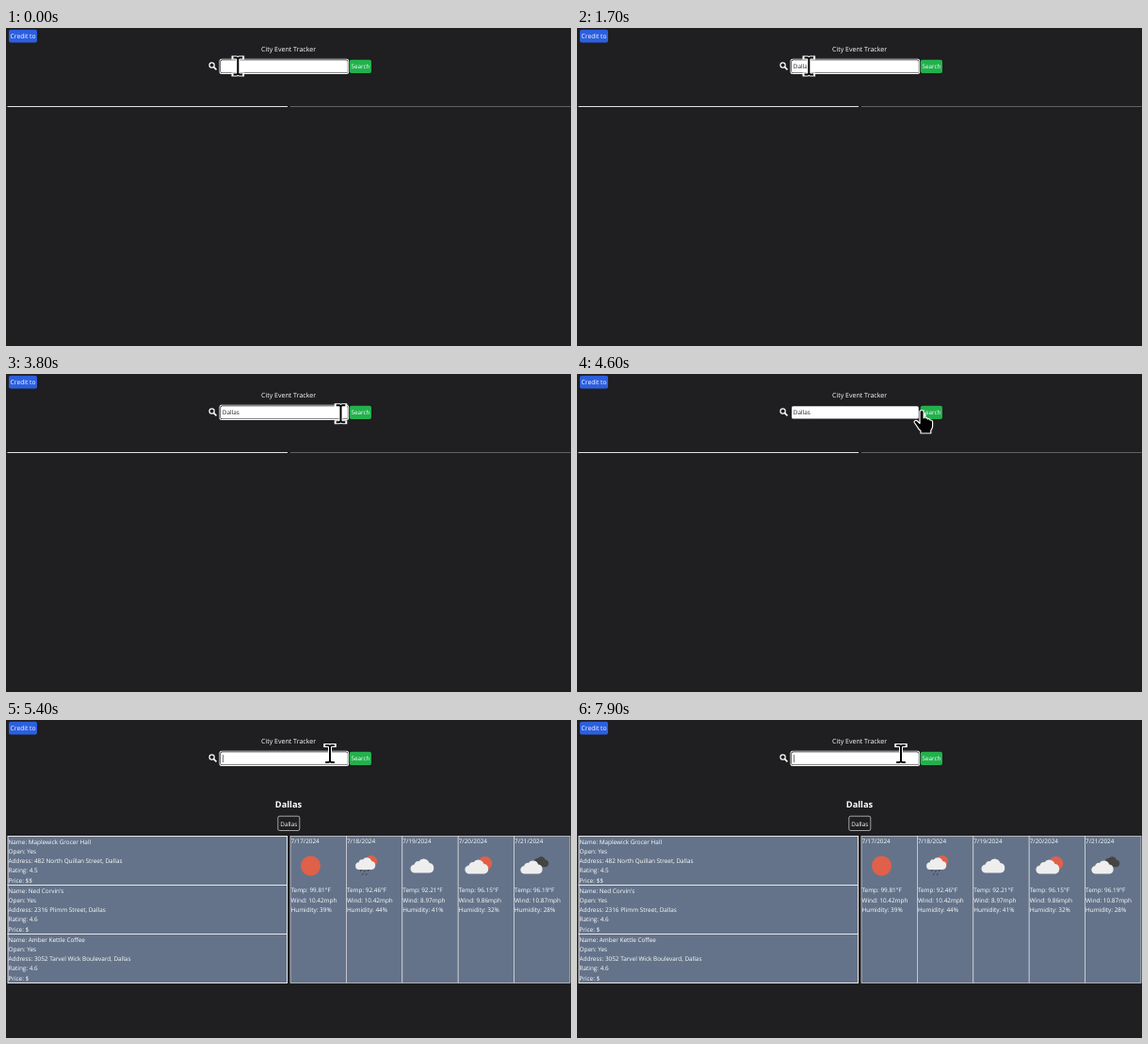
Write an HTML page that moves like this. It is 600 px wide and 338 px high and loops after 8000 ms.

```html
<!DOCTYPE html>
<html lang="en">
<head>
<meta charset="utf-8">
<title>City Event Tracker</title>
<style>
  html, body { margin: 0; height: 100%; overflow: hidden; background: #1f1e20; }
  svg { display: block; width: 100vw; height: 100vh; }
  text { font: 6.4px "Open Sans", "Noto Sans", sans-serif; fill: #fff; text-rendering: geometricPrecision; white-space: pre; }
  .mid { text-anchor: middle; }
  .line { fill: none; stroke: #fff; }
</style>
</head>
<body>
<svg viewBox="0 0 600 338">
  <defs>
    <path id="cloud" d="M4.5 17a4.5 4.5 0 0 1-.6-9A4 4 0 0 1 8.700 4.700A6.300 6.300 0 0 1 19.800 6.500A5.300 5.300 0 0 1 20 17Z"/>
    <path id="bar" d="M-4.800-9H-1.500L0-8L1.500-9H4.800M0-8V8M-4.800 9H-1.500L0 8L1.500 9H4.800"/>
  </defs>

  <rect x="3" y="1.800" width="30" height="13.700" rx="2" fill="#2c5fdf"/>
  <text class="mid" x="18" y="11.100" style="font-size:6.7px">Credit to</text>
  <text class="mid" x="300" y="25.300" style="font-size:7.05px">City Event Tracker</text>

  <g class="line" stroke-width="1.200">
    <circle cx="218.600" cy="39.500" r="2.600"/>
    <path d="M220.500 41.400L223.500 44.400" stroke-width="1.500"/>
  </g>
  <g id="ring">
    <rect x="226.500" y="32.700" width="137.600" height="16.200" rx="2.500" fill="#fff"/>
    <rect x="227.400" y="33.500" width="135.800" height="14.600" rx="2" fill="#101010"/>
  </g>
  <rect x="228" y="34.200" width="134.800" height="13.400" rx="1.600" fill="#fff"/>
  <text id="query" x="229.800" y="43.400" style="fill:#222"></text>
  <rect id="caret" y="37" width=".6" height="8" fill="#222"/>
  <rect x="364.800" y="33.800" width="23.200" height="14.200" rx="2" fill="#22b14c"/>
  <text class="mid" x="376.400" y="43.400" style="font-size:6.3px">Search</text>

  <g id="empty">
    <rect x="1.500" y="83" width="297.500" height="1" fill="#e4e4e4"/>
    <rect x="302" y="83.100" width="297.500" height=".8" fill="#747474"/>
  </g>
  <g id="results"></g>

  <g id="beam" fill="none">
    <use href="#bar" stroke="#fff" stroke-width="4" stroke-linecap="square"/>
    <use href="#bar" stroke="#000" stroke-width="2"/>
  </g>
  <path id="hand" fill="#000" stroke="#fff" stroke-width="1.200" stroke-linejoin="round"
    d="M-2 2Q-2 0 0 0T2.200 2V8.500Q4-.0 4 8.200Q6 7.700 6.300 9.300Q8.500 8.700 9 10.600Q11.600 10 11.600 12.800V17Q11.600 19 9.800 21.500V24.500H-1V22Q-3.500 20-5 17L-7.800 13Q-8.300 11.500-6.800 11Q-5.300 10.600-4 12L-2 14Z"/>
</svg>
<script>
const $ = id => document.getElementById(id);
const show = (id, on) => $(id).style.display = on ? '' : 'none';
const text = (x, y, s, attrs = '') => `<text x="${x}" y="${y}" ${attrs}>${s}</text>`;
const lines = (x, y, list) => list.map((s, i) => text(x, y + i * 10.25, s)).join('');
const disc = (x, y, r) => `<circle cx="${x}" cy="${y}" r="${r}" fill="#e0604a"/>`;
const cloud = (x, y, k = 1, fill = '#eee') =>
  `<use href="#cloud" transform="translate(${x} ${y}) scale(${k})" fill="${fill}"/>`;

const places = [
  ['Maplewick Grocer Hall', '482 North Quillan Street', 4.5, '$$'],
  ["Ned Corvin's", '2316 Plimm Street', 4.6, '$'],
  ['Amber Kettle Coffee', '3052 Tarvel Wick Boulevard', 4.6, '$']
];
const rain = [[15, 160], [19, 161], [23, 160], [17, 164], [21, 164]]
  .map(([x, y]) => `<path d="M${x + 1} ${y - 1}l-1.200 2" stroke="#444" stroke-width="1"/>`).join('');
// Icons are placed relative to the left edge of each day column.
const days = [
  ['99.81', '10.42', 39, disc(21.5, 155, 10.5)],
  ['92.46', '10.42', 44, disc(26.5, 150.200, 6.2) + cloud(10, 144.500, .85) + rain],
  ['92.21', '8.97', 41, cloud(9, 145.500)],
  ['96.15', '9.86', 32, disc(28.500, 152.500, 7.5) + cloud(7.500, 146.500)],
  ['96.19', '10.87', 28, cloud(18.500, 143.700, .74, '#444') + cloud(7, 147.500, .94)]
];

$('results').innerHTML =
  text(300, 92.500, 'Dallas', 'class="mid" style="font-size:9.3px;font-weight:700"') +
  '<rect class="line" x="288.800" y="102.200" width="23" height="15.300" rx="1.800" stroke-width=".6"/>' +
  text(300.3, 112.500, 'Dallas', 'class="mid"') +
  places.map(([name, address, rating, price], i) => {
    const y = 123.5 + i * 52;
    return `<rect x="2" y="${y}" width="296.500" height="52" fill="#64738a" stroke="#e8e8e8"/>` +
      lines(2.5, y + 8.100, ['Name: ' + name, 'Open: Yes', `Address: ${address}, Dallas`,
        'Rating: ' + rating, 'Price: ' + price]);
  }).join('') +
  days.map(([temp, wind, humidity, icon], i) =>
    `<g transform="translate(${302 + i * 59.4} 0)">
      <rect y="123.400" width="59.400" height="156" fill="#64738a" stroke="#e0e0e0" stroke-width=".7"/>
      ${text(.5, 131.3, `7/${17 + i}/2024`)}${icon}
      ${lines(.5, 183.4, [`Temp: ${temp}°F`, `Wind: ${wind}mph`, `Humidity: ${humidity}%`])}
    </g>`).join('');

const keys = [1000, 1200, 1300, 1500, 1600, 1900];
const path = [
  [0, 246.3, 40.5], [2750, 246.3, 40.5], [3100, 277.2, 46], [3300, 277.2, 46], [3700, 345, 46],
  [3900, 366, 38.5], [4600, 366, 38.5], [4700, 355, 37.5], [5100, 344, 36], [8000, 344, 36]
];

function pointer(t) {
  const i = path.findIndex(p => p[0] > t);
  const [a, b] = [path[i - 1], path[i]];
  const k = (t - a[0]) / (b[0] - a[0]);
  return [a[1] + (b[1] - a[1]) * k, a[2] + (b[2] - a[2]) * k];
}

function draw(now) {
  const t = Math.floor(now % 8000 / 100) * 100;
  const done = t >= 4700;
  const typed = done ? 0 : keys.filter(k => k <= t).length;
  const focused = t < 4200 || t >= 5300;
  const blinkStart = t >= 5300 ? 5300 : typed ? keys[typed - 1] : -600;

  $('query').textContent = 'Dallas'.slice(0, typed);
  $('caret').setAttribute('x', 230 + (typed ? $('query').getComputedTextLength() : 0));
  show('caret', focused && (t - blinkStart) % 1060 < 530);
  show('ring', focused);
  show('results', done);
  show('empty', !done);

  const [x, y] = pointer(t);
  const overButton = x >= 364;
  show('hand', overButton);
  show('beam', !overButton);
  $(overButton ? 'hand' : 'beam').setAttribute('transform', `translate(${x} ${y})`);
  requestAnimationFrame(draw);
}
requestAnimationFrame(draw);
</script>
</body>
</html>
```
